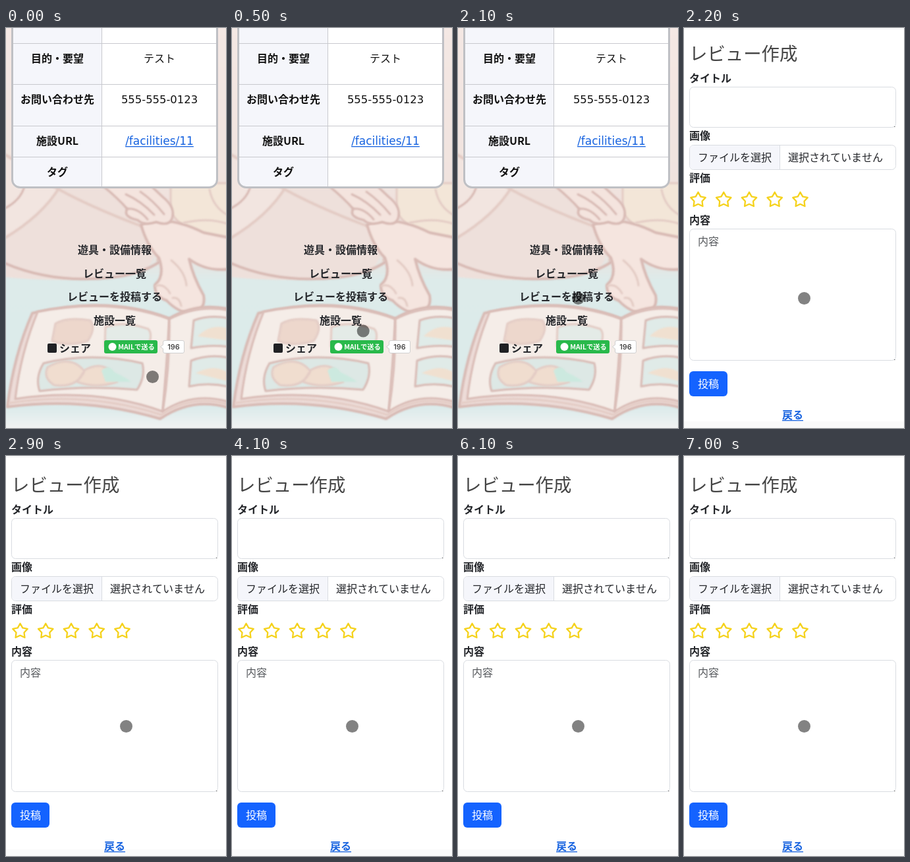
An HTML page with a canvas that plays this animation: 334x606 px, repeating every 7100 ms.

```html
<!DOCTYPE html>
<html lang="ja">
<head>
<meta charset="utf-8">
<title>レビュー作成</title>
<style>
html, body { margin: 0; width: 100%; height: 100%; overflow: hidden; background: #fff; }
canvas { display: block; width: 334px; height: 606px; }
</style>
</head>
<body>
<canvas id="stage"></canvas>
<script>
const W = 334, H = 606, LOOP = 7100, STEP = 100;
const OPEN_FORM = 2200, CURSOR_STOP = 900;
const JP = '"Noto Sans CJK JP", "Noto Sans CJK", sans-serif';
const LATIN = '"DejaVu Sans", sans-serif';
const INK = '#24262a', LINK = '#1763e0';

const scale = window.devicePixelRatio || 1;
function makeSurface(canvas) {
  canvas.width = W * scale;
  canvas.height = H * scale;
  const c = canvas.getContext('2d');
  c.scale(scale, scale);
  return c;
}
const ctx = makeSurface(document.getElementById('stage'));

const clamp = v => Math.max(0, Math.min(1, v));
const smooth = v => v * v * (3 - 2 * v);
const mix = (a, b, k) => a + (b - a) * k;

// Text is placed by its vertical middle.
function text(c, str, x, cy, { size = 16, weight = 500, color = INK, align = 'left', font = JP, ruled = false } = {}) {
  c.font = `${weight} ${size}px ${font}`;
  c.fillStyle = color;
  c.textAlign = align;
  c.fillText(str, x, cy + size * 0.38);
  if (ruled) {
    const w = c.measureText(str).width;
    c.fillRect(align === 'center' ? x - w / 2 : x, Math.round(cy + size * 0.38 + 1.5), w, 1.3);
  }
}

function box(c, x, y, w, h, r, fill, stroke, weight = 1) {
  c.beginPath();
  c.roundRect(x, y, w, h, r);
  if (fill) { c.fillStyle = fill; c.fill(); }
  if (stroke) { c.strokeStyle = stroke; c.lineWidth = weight; c.stroke(); }
}

function shape(c, d, fill, stroke, weight = 3) {
  const p = new Path2D(d);
  if (fill) { c.fillStyle = fill; c.fill(p); }
  if (stroke) { c.strokeStyle = stroke; c.lineWidth = weight; c.stroke(p); }
}

function drawIllustration(c) {
  const contour = '#d8bab4', faint = '#e3cbc4', cream = '#f5ede8';
  c.save();
  c.filter = 'blur(0.8px)';
  c.lineCap = c.lineJoin = 'round';

  const wash = c.createLinearGradient(0, 0, 0, H);
  wash.addColorStop(0, '#f4e8e4');
  wash.addColorStop(0.55, '#efe1dc');
  wash.addColorStop(0.63, '#ddebea');
  wash.addColorStop(0.95, '#dcebeb');
  wash.addColorStop(1, '#f1f2f2');
  c.fillStyle = wash;
  c.fillRect(-5, -5, W + 10, H + 10);

  // Lap and sleeve
  shape(c, 'M-5 190 L210 235 Q252 300 215 365 Q120 390 -5 377 Z', '#eee0db');
  shape(c, 'M-5 190 L82 240 Q55 285 -5 320 Z', '#f2e5e0', faint, 4);
  shape(c, 'M72 240 Q125 270 205 300 Q245 325 230 352', null, faint, 4);
  shape(c, 'M-5 355 Q70 388 160 378 Q205 373 232 355', null, contour, 4);
  shape(c, 'M28 240 Q22 262 -5 275', null, contour);

  // Child: clothing, leg and foot
  shape(c, 'M250 235 H340 V330 Q285 325 250 280 Z', '#f3e6d8', faint);
  shape(c, 'M205 298 Q245 282 300 310 L340 318 V365 Q305 370 278 350 Q284 377 300 405 Q304 428 281 433 Q260 430 244 413 Q225 406 226 389 Q242 376 232 348 Q214 330 205 298 Z', '#f5e5df', contour, 4);
  shape(c, 'M227 391 Q240 386 249 402 M253 409 Q263 407 266 421 M251 352 Q272 369 274 390', null, faint);
  shape(c, 'M270 295 Q310 286 340 298 M309 245 Q315 274 340 285', null, faint);

  // Hand
  shape(c, 'M148 240 Q170 258 184 274 Q177 286 200 291 Q209 300 228 294 Q247 301 252 289 Q258 272 238 256 L221 240 Z', '#f4e4de', contour, 3.5);
  shape(c, 'M182 252 Q205 262 225 283 M204 248 Q224 262 240 282 M184 274 Q200 272 215 290', null, contour);

  // Open book
  shape(c, 'M40 432 Q12 495 2 574 Q120 558 234 592 Q284 558 340 576 V426 Q289 415 248 440 Q157 405 40 432 Z', '#eddcd8', contour, 4);
  shape(c, 'M48 430 Q22 493 14 562 Q135 544 238 581 Q244 510 248 441 Q160 408 48 430 Z', cream, contour);
  shape(c, 'M248 441 Q292 418 340 428 V567 Q284 550 238 581 Q249 510 248 441 Z', cream, contour);
  shape(c, 'M6 568 Q124 550 236 586 Q282 554 340 571', null, faint);

  // Pictures on the pages
  shape(c, 'M75 448 Q92 437 128 443 Q137 455 124 474 Q94 483 70 474 Z', '#edd7cc', faint);
  shape(c, 'M151 453 Q180 443 216 456 Q224 465 214 486 Q182 492 150 482 Z', '#e4ebe7', faint);
  shape(c, 'M57 508 Q130 490 207 508 Q212 528 199 548 Q125 541 51 550 Q44 529 57 508 Z', '#dde8e5', contour);
  shape(c, 'M63 514 Q98 494 119 520 Q107 546 73 541 Q56 530 63 514 Z M120 518 Q153 500 169 536 Q137 547 108 536 Z', '#f0ddcf', faint);
  shape(c, 'M145 519 Q157 508 164 521 Q181 529 190 536 H151 Z', '#cce9df');
  shape(c, 'M285 443 Q310 434 340 440 V483 Q309 479 281 485 Z', '#e0ebe8', contour);
  shape(c, 'M281 504 Q309 493 340 500 V544 Q309 536 278 543 Z', '#e0ebe8', contour);
  shape(c, 'M291 467 Q312 446 340 456 V474 Z M288 523 Q317 507 340 524 V536 Z', '#f0e0d0');
  c.restore();
}

function drawTable(c) {
  box(c, 9.5, -30, 311, 271.5, 12, '#fff');
  c.save();
  c.clip();
  c.fillStyle = '#f5f6fb';
  c.fillRect(9, 0, 136, 243);
  c.fillStyle = '#c8c9ce';
  for (const y of [23, 85, 148, 195]) c.fillRect(9, y, 312, 1);
  c.fillRect(145, 0, 1, 243);
  c.restore();
  box(c, 9.5, -30, 311, 271.5, 12, null, '#bfc0c4', 3);

  const rows = [['目的・要望', 46], ['お問い合わせ先', 108], ['施設URL', 171], ['タグ', 218]];
  for (const [label, y] of rows)
    text(c, label, 78, y, { weight: 700, color: '#111', align: 'center' });
  text(c, 'テスト', 233, 46, { color: '#111', align: 'center' });
  text(c, '555-555-0123', 233, 108, { size: 16.4, weight: 400, color: '#111', align: 'center', font: LATIN });
  text(c, '/facilities/11', 233, 171, { size: 17, weight: 400, color: LINK, align: 'center', font: LATIN, ruled: true });
}

function drawShareRow(c) {
  box(c, 63, 478, 14, 14, 2, '#202124');
  text(c, 'シェア', 81, 485, { weight: 700 });
  box(c, 149, 473, 81, 20, 3, '#29b94b');
  c.fillStyle = '#fff';
  c.beginPath();
  c.arc(161.5, 483, 6, 0, 7);
  c.fill();
  text(c, 'MAILで送る', 198, 483, { size: 10.3, weight: 700, color: '#fff', align: 'center' });
  box(c, 238.5, 473.5, 32, 19, 2.5, '#fff', '#d0d0d0');
  shape(c, 'M239 479.5 L234.5 483 L239 486.5', '#fff', '#d0d0d0', 1);
  text(c, '196', 254.5, 483, { size: 11, color: '#333', align: 'center', font: 'Inter, sans-serif' });
}

function drawFacilityPage(c) {
  drawIllustration(c);
  drawTable(c);
  const links = [['遊具・設備情報', 336], ['レビュー一覧', 372], ['レビューを投稿する', 407], ['施設一覧', 443]];
  for (const [label, y] of links)
    text(c, label, 165, y, { weight: 700, align: 'center' });
  drawShareRow(c);
}

function drawStar(c, cx, cy) {
  const points = Array.from({ length: 10 }, (_, i) => {
    const r = i % 2 ? 6.3 : 11.8, a = i * Math.PI / 5;
    return `${cx + r * Math.sin(a)} ${cy - r * Math.cos(a)}`;
  });
  c.lineJoin = 'round';
  shape(c, `M${points.join('L')}Z`, null, '#f5d21c', 2.3);
}

function drawField(c, y, h) {
  box(c, 8.5, y + 0.5, 313, h - 1, 6, '#fff', '#d9dce1');
}

function drawResizer(c, y) {
  c.fillStyle = '#666';
  c.fillRect(319, y - 2, 1.5, 1);
}

function drawForm(c) {
  const label = (str, y) => text(c, str, 8, y, { weight: 700 });
  text(c, 'レビュー作成', 8, 44, { size: 27.4, color: '#444' });

  label('タイトル', 81);
  drawField(c, 94, 62);
  drawResizer(c, 156);

  label('画像', 168);
  drawField(c, 182, 38);
  box(c, 9, 183, 136, 36, [5, 0, 0, 5], '#f5f6fb');
  c.fillStyle = '#d9dce1';
  c.fillRect(145, 183, 1, 36);
  text(c, 'ファイルを選択', 21, 201);
  text(c, '選択されていません', 158, 201);

  label('評価', 232);
  for (let i = 0; i < 5; i++) drawStar(c, 21.5 + i * 38.75, 265.5);

  label('内容', 296);
  drawField(c, 309, 200);
  drawResizer(c, 509);
  text(c, '内容', 21, 328, { color: '#55585c' });

  box(c, 8, 525, 58, 38, 6, '#1463ff');
  text(c, '投稿', 21, 544, { color: '#fff' });
  text(c, '戻る', 165, 591, { weight: 700, color: LINK, align: 'center', ruled: true });
}

function drawFormPage(c, t) {
  const settle = clamp((t - OPEN_FORM) / 200);
  c.fillStyle = '#fff';
  c.fillRect(0, 0, W, H);
  c.fillStyle = '#fafafa';
  c.fillRect(0, 0, W, 3);
  c.fillRect(0, 596, W, 10);
  c.save();
  c.translate(0, Math.round(-5 * (1 - settle)));
  drawForm(c);
  c.restore();
}

function drawCursor(c, t) {
  const k = smooth(clamp(t / CURSOR_STOP));
  c.fillStyle = 'rgba(0,0,0,0.49)';
  c.beginPath();
  c.arc(mix(222.5, 182.5, k), mix(528.5, 409.5, k), 9.5, 0, 7);
  c.fill();
}

const facility = document.createElement('canvas');
drawFacilityPage(makeSurface(facility));

const start = performance.now();
function render(now) {
  const t = Math.floor((Math.max(0, now - start) % LOOP) / STEP) * STEP;
  if (t < OPEN_FORM) ctx.drawImage(facility, 0, 0, W, H);
  else drawFormPage(ctx, t);
  drawCursor(ctx, t);
  requestAnimationFrame(render);
}
render(start);
</script>
</body>
</html>
```
